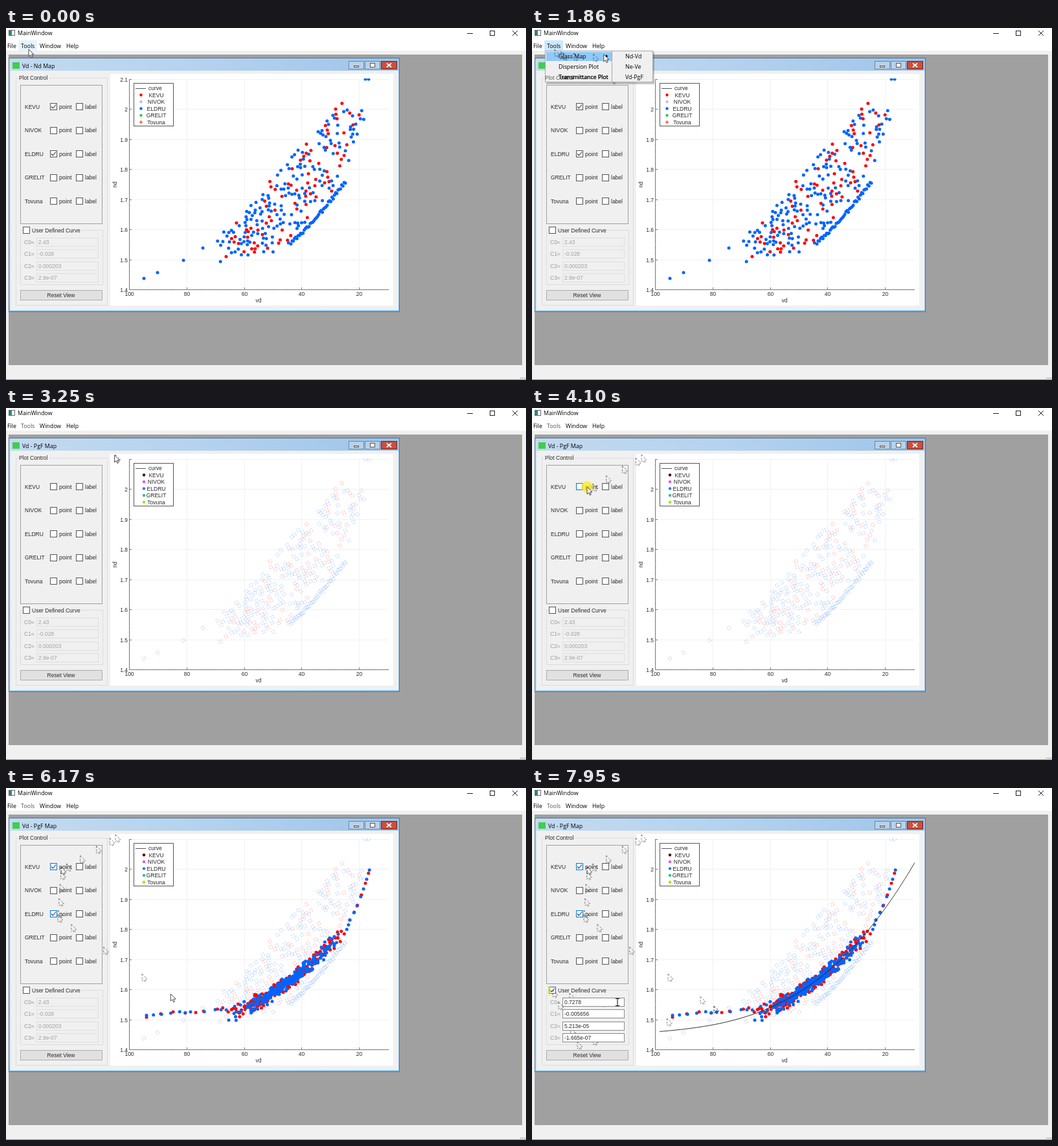
Animation of 803x544 px, one loop 8000 ms. Source, as an HTML page with a canvas:

```html
<!DOCTYPE html>
<html lang="en">
<head>
<meta charset="utf-8">
<title>Glass map viewer</title>
<style>
html, body { margin: 0; width: 100%; height: 100%; overflow: hidden; background: #f0f0f0; }
canvas { display: block; }
</style>
</head>
<body>
<canvas id="stage" width="803" height="544"></canvas>
<script>
const ctx = document.getElementById('stage').getContext('2d');
const LOOP = 8000, STEP = 1000 / 13;
const UI = '"Open Sans", sans-serif', BODY = '"Liberation Sans", sans-serif';
const RED = '#ff0000', BLUE = '#0064ff', INK = '#2a2a2a';
const MAKERS = ['KEVU', 'NIVOK', 'ELDRU', 'GRELIT', 'Tovuna'];
const LEGEND_A = [RED, '#c8b4fa', BLUE, '#32c85a', '#e67d32'];
const LEGEND_B = ['#5a0000', '#e650f0', '#3278ff', '#28c882', '#a0e600'];
const T = { menu: 310, hover: 850, submenu: 1780, third: 2240, map: 2705,
  red: 4170, blue: 5330, curve: 7490 };

const REST = { x: 35, y: 33 };
const MOVES = [
  { from: 770, to: 1000, x: 48, y: 38 },
  { from: 1400, to: 1860, x: 111, y: 41 },
  { from: 1860, to: 2170, x: 160, y: 68 },
  { from: 2240, to: 2470, x: 169, y: 72 },
  { from: 3170, to: 3940, x: 85, y: 122 },
  { from: 4410, to: 5170, x: 80, y: 196 },
  { from: 5560, to: 6330, x: 281, y: 337 },
  { from: 6330, to: 6720, x: 70, y: 392 },
  { from: 6720, to: 7170, x: 32, y: 312 },
  { from: 7490, to: 7950, x: 132, y: 331 }
];

const ease = k => k * k * (3 - 2 * k);

function pointerAt(t) {
  let { x, y } = REST;
  for (const move of MOVES) {
    const k = ease(Math.min(1, Math.max(0, (t - move.from) / (move.to - move.from))));
    x += (move.x - x) * k;
    y += (move.y - y) * k;
  }
  return [x, y];
}

// Every second step of a move leaves a faint outline behind
const TRAIL = MOVES.flatMap(({ from, to }) => {
  const marks = [];
  for (let t = from; t < to; t += 2 * STEP) marks.push({ t, at: pointerAt(t) });
  return marks;
});

function seeded(seed) {
  return () => {
    seed = seed + 0x6D2B79F5 | 0;
    let v = Math.imul(seed ^ seed >>> 15, 1 | seed);
    v = v + Math.imul(v ^ v >>> 7, 61 | v) ^ v;
    return ((v ^ v >>> 14) >>> 0) / 4294967296;
  };
}

function heightAt(outline, x) {
  let i = 1;
  while (i < outline.length - 1 && outline[i][0] < x) i++;
  const [ax, ay] = outline[i - 1], [bx, by] = outline[i];
  return ay + (by - ay) * (x - ax) / (bx - ax);
}

const curveY = x => {
  const v = 100 - (x - 190) / 4.4375;
  const p = 0.7278 - 0.005656 * v + 5.213e-5 * v ** 2 - 1.665e-7 * v ** 3;
  return 377 - (p - 0.517) * 1626;
};

// Wedge of glasses between two outlines, dense along its lower right edge
function buildNd() {
  const rand = seeded(17);
  const top = [[320, 325], [355, 302], [385, 262], [430, 208], [458, 178], [490, 150], [515, 112], [562, 128]];
  const bottom = [[320, 368], [350, 352], [400, 350], [432, 340], [460, 314], [490, 281], [524, 238],
    [531, 198], [545, 165], [562, 143]];
  const red = [], blue = [[213, 387], [234, 378], [274, 359], [304, 340], [555, 79], [560, 79]];
  for (let i = 0; i < 46; i++) {
    const x = 440 + i * 84 / 45;
    blue.push([x, heightAt(bottom, x) + (rand() - 0.5) * 6]);
  }
  const placed = [...blue];
  for (let tries = 0; tries < 1500 && placed.length < 300; tries++) {
    const x = 322 + 240 * (0.7 * rand() + 0.3 * rand()) ** 1.1;
    const a = heightAt(top, x), point = [x, a + (heightAt(bottom, x) - a) * rand()];
    if (placed.some(([px, py]) => Math.hypot(px - x, py - point[1]) < 4)) continue;
    placed.push(point);
    (rand() < 0.33 ? red : blue).push(point);
  }
  return { red, blue };
}

// Narrow band around the curve with a flat left tail and a steep right end
function buildPgF(seed, count) {
  const rand = seeded(seed), points = [];
  for (let x = 217; x < 340; x += 8 + 18 * rand()) points.push([x, 350 - (x - 217) / 9 + 6 * rand()]);
  for (let x = 531; x < 562; x += 4 + 3 * rand()) points.push([x, curveY(x) - (x - 525) ** 2 / 36]);
  for (let i = 0; i < count; i++) {
    const x = 338 + 193 * (0.6 * rand() + 0.4 * rand());
    points.push([x, curveY(x) + 1 + (rand() + rand() - 1) * 14]);
  }
  return points;
}

const nd = buildNd();
const pgf = { red: buildPgF(5, 260), blue: buildPgF(29, 235) };

function box(x, y, w, h, fill, stroke) {
  if (fill) { ctx.fillStyle = fill; ctx.fillRect(x, y, w, h); }
  if (stroke) {
    ctx.strokeStyle = stroke; ctx.lineWidth = 1;
    ctx.strokeRect(x + 0.5, y + 0.5, w - 1, h - 1);
  }
}
function line(points, color = '#000', width = 1) {
  ctx.strokeStyle = color; ctx.lineWidth = width;
  ctx.beginPath();
  points.forEach(([x, y]) => ctx.lineTo(x, y));
  ctx.stroke();
}
function text(s, x, y, { color = INK, font = BODY, size = 8.5, align = 'left' } = {}) {
  ctx.font = `${size}px ${font}`;
  ctx.fillStyle = color; ctx.textAlign = align; ctx.textBaseline = 'alphabetic';
  ctx.fillText(s, x, y + 3);
}
const uiText = (s, x, y, color = '#000') => text(s, x, y, { color, font: UI, size: 8.8 });
function dot(x, y, r, color) {
  ctx.fillStyle = color;
  ctx.beginPath(); ctx.arc(x, y, r, 0, 7); ctx.fill();
}
const dots = (points, color) => points.forEach(([x, y]) => dot(x, y, 2.5, color));
function rings(points, color) {
  ctx.strokeStyle = color; ctx.lineWidth = 0.6;
  ctx.setLineDash([2.5, 1.5]);
  points.forEach(([x, y]) => { ctx.beginPath(); ctx.arc(x, y, 2.7, 0, 7); ctx.stroke(); });
  ctx.setLineDash([]);
}
function check(x, y, on, focus) {
  box(x, y, 11, 11, '#fff', focus ? '#0078d7' : '#555');
  if (on) line([[x + 2, y + 5.5], [x + 4.5, y + 8], [x + 9, y + 2.5]], '#333', 1.1);
}
function pointer(x, y, ghost) {
  ctx.save();
  ctx.translate(x, y);
  ctx.beginPath();
  [[0, 0], [0, 11], [2.6, 8.7], [4.4, 12.6], [6.2, 11.8], [4.5, 8], [8, 7.8]].forEach(p => ctx.lineTo(...p));
  ctx.closePath();
  ctx.lineWidth = 0.8; ctx.strokeStyle = '#222';
  if (ghost) { ctx.globalAlpha = 0.7; ctx.setLineDash([3, 2.2]); }
  else { ctx.fillStyle = '#fff'; ctx.fill(); }
  ctx.stroke();
  ctx.restore();
}

function drawFrame(t) {
  box(0, 0, 803, 544, '#f0f0f0');
  box(0, 0, 803, 35, '#fff');
  box(4, 41, 793, 480, '#a0a0a0');
  box(0, 543, 803, 1, '#8a8a8a');
  for (let i = 0; i < 3; i++) box(800 - i * 3, 540, 2, 2, '#bbb');
  box(4, 3, 10, 9, '#fff', '#667');
  box(5, 4, 4, 7, '#2a8a7a');
  uiText('MainWindow', 18, 8);
  line([[712, 8.5], [721, 8.5]], '#222');
  box(747, 4, 8, 8, null, '#222');
  line([[782, 4], [790, 12]], '#222'); line([[790, 4], [782, 12]], '#222');
  if (t < T.map) box(19, 19, 29, 16, t < T.menu ? '#e5f3ff' : '#cce8ff');
  uiText('File', 2, 27.5);
  uiText('Tools', 23, 27.5, t < T.map ? '#000' : '#555');
  uiText('Window', 52, 27.5);
  uiText('Help', 93, 27.5);

  const fill = ctx.createLinearGradient(4, 46, 608, 70);
  fill.addColorStop(0, '#c3daef'); fill.addColorStop(0.5, '#b4d2ef'); fill.addColorStop(1, '#9fc4e9');
  box(4, 46, 604, 393, fill, '#55748f');
  box(7, 66, 599, 370, '#f0f0f0');
  box(5, 437, 602, 1, '#56c5ee');
  box(10, 53, 11, 10, '#41cd52');
  uiText(t < T.map ? 'Vd - Nd Map' : 'Vd - PgF Map', 25, 58.5);
  for (const x of [529, 554]) box(x, 51, 24, 13, '#b9d1ea', '#6b87a3');
  box(579, 51, 25, 13, '#c9503f', '#6d2018');
  box(537, 58, 8, 3, '#fff', '#555');
  box(562, 54, 8, 7, '#fff', '#555');
  line([[588, 54.5], [595, 60.5]], '#fff', 1.8); line([[595, 54.5], [588, 60.5]], '#fff', 1.8);
}

function drawControls(t) {
  const old = t < T.map;
  box(15, 77, 142, 352, null, '#dcdcdc');
  box(18, 72, 48, 10, '#f0f0f0');
  text('Plot Control', 20, 76.5);
  box(22, 88, 127, 215, null, '#a0a0a0');
  MAKERS.forEach((name, i) => {
    const y = 121.5 + i * 36.5, top = Math.round(y - 5.5);
    const on = i === 0 ? old || t >= T.red : i === 2 && (old || t >= T.blue);
    const focus = !old && (i === 0 && t >= 3940 || i === 2 && t >= 5170);
    text(name, 29, y);
    check(68, top, on, focus);
    text('point', 82, y, { size: 9 });
    check(108, top, false);
    text('label', 122, y);
  });
  box(22, 312, 128, 85, null, '#dcdcdc');
  box(25, 306, 91, 12, '#f0f0f0');
  text('User Defined Curve', 40, 312.5);
  check(26, 307, t >= T.curve, t >= 7170);
  box(22, 405, 127, 16, '#e1e1e1', '#adadad');
  text('Reset View', 85, 413, { align: 'center' });
}

function drawFields(t) {
  const active = t >= T.curve;
  const values = active ? ['0.7278', '-0.005656', '5.213e-05', '-1.665e-07']
    : ['2.43', '-0.028', '0.000203', '2.9e-07'];
  values.forEach((value, i) => {
    const y = 330.5 + i * 18.5;
    text(`C${i}=`, 28, y, { color: '#999' });
    box(47, Math.round(y - 7), 96, 14, active ? '#fff' : '#f0f0f0', active ? '#8a8a8a' : '#dedede');
    text(value, 50, y, { color: active ? INK : '#a0a0a0' });
  });
}

function drawAxes(t) {
  for (let i = 0; i < 8; i++) {
    const y = Math.round(79 + i * 46.45) + 0.5;
    if (i < 7) line([[191, y], [591, y]], '#f1f1f1');
    line([[190, y], [194, y]], '#777');
    if (t < T.map || i) text(String(+(2.1 - i / 10).toFixed(1)), 188, y, { align: 'right' });
  }
  for (let i = 0; i < 5; i++) {
    const x = Math.round(190 + i * 88.75) + 0.5;
    if (i) line([[x, 79], [x, 404]], '#f1f1f1');
    line([[x, 401], [x, 405]], '#777');
    text(String(100 - i * 20), x, 410.5, { align: 'center' });
  }
  for (let y = 79.5; y < 404; y += 9.29) line([[190, y], [192, y]], '#999', 0.5);
  for (let x = 190.5; x < 591; x += 22.19) line([[x, 403], [x, 405]], '#999', 0.5);
  line([[190.5, 79], [190.5, 404.5], [591, 404.5]], '#777');
  text('vd', 390, 421, { align: 'center' });
  ctx.save();
  ctx.translate(168, 242); ctx.rotate(-Math.PI / 2);
  text('nd', 0, 0, { align: 'center' });
  ctx.restore();
}

function drawPlot(t) {
  const old = t < T.map;
  box(161, 71, 437, 358, '#fff');
  drawAxes(t);
  ctx.save();
  ctx.beginPath(); ctx.rect(191, 78, 400, 326); ctx.clip();
  if (old) {
    dots(nd.red, RED);
    dots(nd.blue, BLUE);
  } else {
    rings(nd.red, '#ff8080');
    rings(nd.blue, '#80b0ff');
    if (t >= T.red) dots(pgf.red, RED);
    if (t >= T.blue) dots(pgf.blue, BLUE);
    if (t >= T.curve) {
      const trace = [];
      for (let x = 197; x <= 591; x += 2) trace.push([x, curveY(x)]);
      line(trace, '#222', 0.9);
    }
  }
  ctx.restore();

  box(197, 85, 62, 67, '#fff', '#555');
  line([[200, 93.5], [216, 93.5]], '#555');
  text('curve', 220, 93);
  MAKERS.forEach((name, i) => {
    const y = 103.5 + i * 10.5;
    dot(old ? 208.5 : 213, y, 2.2, (old ? LEGEND_A : LEGEND_B)[i]);
    text(name, 232, y, { align: 'center' });
  });
}

function drawPanel(x, width, items, selected) {
  box(x + 2, 37, width, 50, 'rgba(0,0,0,.22)');
  box(x, 35, width, 49, '#f0f0f0', '#a8a8a8');
  if (selected >= 0) box(x + 2, Math.round(37 + selected * 15.5), width - 4, 14, '#91c9f7');
  items.forEach((s, i) => uiText(s, x + 21, 44 + i * 15.8));
}

function drawMenu(t) {
  if (t < T.menu || t >= T.map) return;
  ctx.save();
  ctx.globalAlpha = Math.min(1, (t - T.menu + STEP) / 230);
  drawPanel(20, 107, ['Glass Map', 'Dispersion Plot', 'Transmittance Plot'], t >= T.hover ? 0 : -1);
  uiText('Transmittance Plot', 41.3, 75.6);
  ctx.fillStyle = '#000';
  ctx.beginPath(); ctx.moveTo(114, 41); ctx.lineTo(117.5, 43.5); ctx.lineTo(114, 46); ctx.fill();
  text('Plot Control', 20, 76.5, { color: 'rgba(0,0,0,.6)' });
  if (t >= T.submenu) drawPanel(123, 64, ['Nd-Vd', 'Ne-Ve', 'Vd-PgF'], t >= T.third ? 2 : -1);
  ctx.restore();
}

function drawTrail(t) {
  const cleared = t < T.map ? 0 : T.map;
  TRAIL.forEach(mark => {
    if (mark.t > cleared && mark.t < t - STEP) pointer(...mark.at, true);
  });
}

function drawPointer(t) {
  const [x, y] = pointerAt(Math.floor(t / STEP) * STEP);
  const clicked = [T.map - 300, T.red - 150, T.blue - 90, T.curve - 150].some(c => t >= c && t < c + 225);
  if (clicked) dot(x, y, 9, 'rgba(255,235,30,.75)');
  if (t >= 7900) {
    for (const edge of [325.5, 336.5]) line([[129, edge], [135, edge]]);
    line([[132, 325], [132, 337]]);
  } else pointer(x, y);
}

function render(t) {
  drawFrame(t);
  drawControls(t);
  drawPlot(t);
  if (t < T.curve) drawFields(t);
  drawMenu(t);
  drawTrail(t);
  if (t >= T.curve) {
    drawFields(t);
    box(24, 305, 5, 16, 'rgba(255,235,30,.35)');
  }
  drawPointer(t);
}

const begin = performance.now();
function tick() {
  render((performance.now() - begin) % LOOP);
  requestAnimationFrame(tick);
}
tick();
</script>
</body>
</html>
```
